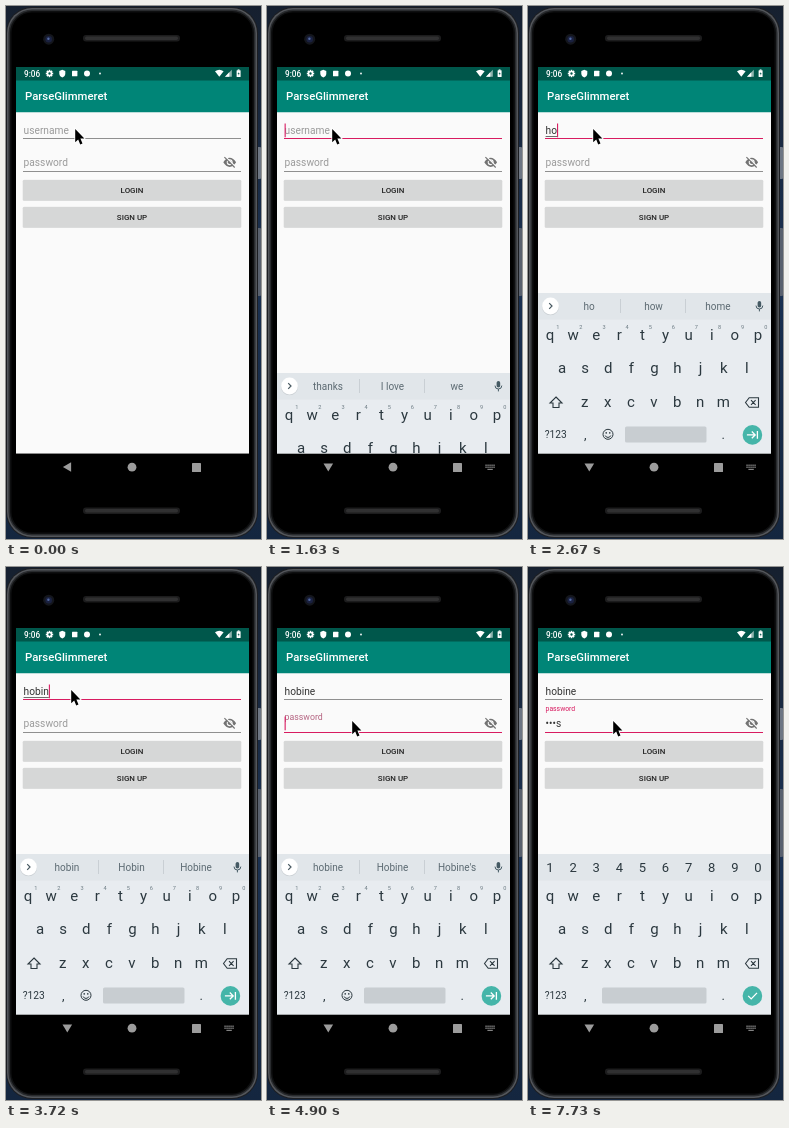
Animation of 255 by 533 pixels, one loop 8 s. Source, as an HTML page with a canvas:

```html
<!DOCTYPE html>
<html lang="en">
<head>
<meta charset="utf-8">
<title>Login screen</title>
<style>
html, body { margin: 0; width: 100%; height: 100%; overflow: hidden; background: #16263f; }
canvas { display: block; width: 255px; height: 533px; }
</style>
</head>
<body>
<canvas id="stage"></canvas>
<script>
const W = 255, H = 533, LOOP = 8000;
const canvas = document.getElementById('stage');
const ratio = window.devicePixelRatio || 1;
canvas.width = W * ratio;
canvas.height = H * ratio;
const c = canvas.getContext('2d');
c.scale(ratio, ratio);

const PINK = '#d81b60', INK = '#2b383f', GREY = '#9b9b9b', DARK = '#333';
const NAV_TOP = 447.8;

const ticks = [0, 900, 1190, 1340, 1480, 1630, 1780, 2220, 2520, 2670, 2970, 3270, 3720, 4020,
  4170, 4320, 4460, 4610, 4760, 4900, 5050, 5350, 5950, 6250, 6690, 6990, 7130, 7730];
const FOCUS_NAME = 1190, KEYBOARD = 1480, FOCUS_PASS = 4900, PASS_KEYS = 5050;
const caretTimes = [[1190, 1780], [2220, 4610], [4900, 5350], [5950, 7730]];
const nameTyping = [[2220, 'h'], [2520, 'ho'], [2970, 'hob'], [3270, 'hobi'], [3720, 'hobin'], [4020, 'hobine']];
const passTyping = [[6250, 'p'], [6690, '•a'], [6990, '••s'], [7130, '•••s']];
const suggestions = [
  [0, ['thanks', 'I love', 'we']], [2220, ['h', 'have', 'he']], [2670, ['ho', 'how', 'home']],
  [2970, ['hob', 'Hob', 'hobby']], [3270, ['hobi', 'Hobi', 'hobbies']],
  [3720, ['hobin', 'Hobin', 'Hobine']], [4020, ['hobine', 'Hobine', "Hobine's"]]
];

const clamp = v => Math.max(0, Math.min(1, v));
const lerp = (a, b, k) => a + (b - a) * k;
const ease = k => (1 - Math.cos(Math.PI * clamp(k))) / 2;
const latest = (list, t, none) => list.reduce((v, [at, value]) => t >= at ? value : v, none);

function text(s, x, y, size, color, align = 'left', weight = 400) {
  c.font = `${weight} ${size}px Roboto, sans-serif`;
  c.textAlign = align;
  c.fillStyle = color;
  c.fillText(s, x, y);
}
function rect(x, y, w, h, color, r = 0) {
  c.fillStyle = color;
  c.beginPath();
  c.roundRect(x, y, w, h, r);
  c.fill();
}
function disc(x, y, r, color) {
  c.fillStyle = color;
  c.beginPath();
  c.arc(x, y, r, 0, 7);
  c.fill();
}
function shape(d, x, y, color, lineWidth) {
  const path = new Path2D(d);
  c.save();
  c.translate(x, y);
  c.fillStyle = c.strokeStyle = color;
  c.lineWidth = lineWidth || 1;
  lineWidth ? c.stroke(path) : c.fill(path, 'evenodd');
  c.restore();
}

function drawPhone() {
  const sky = c.createLinearGradient(0, 0, 0, H);
  sky.addColorStop(0, '#16202f');
  sky.addColorStop(0.5, '#1b3253');
  sky.addColorStop(1, '#14263f');
  rect(0, 0, W, H, sky);
  rect(251, 141, 4, 32, '#6d7683', 1);
  rect(251, 222, 4, 68, '#59616e', 1);
  // Metal rim, from the outer edge to the glass.
  [[0, '#1c1e22'], [1, '#53565b'], [2.5, '#292b2e'], [4, '#0e0f10'], [5.5, '#000']].forEach(([inset, color]) =>
    rect(inset, 1 + inset, 252 - 2 * inset, 531 - 2 * inset, color, 26 - inset));
  for (const y of [29, 501.5]) {
    rect(77, y, 97, 6.5, '#1c1c1d', 3);
    rect(79, y + 1.5, 93, 3.5, '#303031', 2);
  }
  disc(42.7, 33.2, 5.5, '#14161c');
  disc(42.7, 33.2, 3.3, '#1a2140');
  disc(42.4, 32.8, 1.2, '#5268a0');
}

function drawBars() {
  rect(10, 61, 233, NAV_TOP - 61, '#fafafa');
  rect(10, 74, 233, 32.2, '#008577');
  rect(10, 61, 233, 13.5, '#00574b');
  text('9:06', 18, 71, 8.2, '#fff', 'left', 500);
  for (let i = 0; i < 8; i++) {
    c.save();
    c.translate(43.5, 67.5);
    c.rotate(i * Math.PI / 4);
    rect(-0.8, -3.7, 1.6, 2, '#fff');
    c.restore();
  }
  c.strokeStyle = '#fff';
  c.lineWidth = 1.6;
  c.beginPath();
  c.arc(43.5, 67.5, 2, 0, 7);
  c.stroke();
  shape('M0-3.8 3-2.6V0Q3 2.8 0 4Q-3 2.8-3 0V-2.6Z', 56.3, 67.5, '#fff');
  rect(66, 64.8, 5.4, 5.4, '#fff', 0.5);
  disc(81, 67.5, 3, '#fff');
  disc(94, 67.5, 0.9, '#fff');
  shape('M0 3.6-4.3-1.9Q0-5 4.3-1.9Z', 213.3, 67.2, '#fff');
  shape('M3.3-3.5V3.5H-3.5Z', 222.5, 67.3, '#8fb5af');
  shape('M.8-1V3.5H-3.5Z', 222.5, 67.3, '#fff');
  rect(230.6, 64.3, 4, 6.8, '#fff', 0.5);
  rect(231.7, 63.4, 1.8, 1.2, '#fff');
  shape('M.4-2-1 .4H0V2L1-.5H0Z', 232.6, 67.7, '#00574b');
  text('ParseGlimmeret', 19, 94.3, 11.34, '#fff', 'left', 500);
}

function drawUnderline(y, focused) {
  rect(17, y, 218, focused ? 1.1 : 0.9, focused ? PINK : '#8f8f8f');
}

function drawForm(t) {
  const name = latest(nameTyping, t, ''), pass = latest(passTyping, t, '');
  const onPass = t >= FOCUS_PASS, onName = t >= FOCUS_NAME && !onPass;
  const size = 10.2, left = 17.6;

  drawUnderline(132, onName);
  text(name || 'username', left, 128.2, size, name ? DARK : GREY);
  const nameWidth = name ? c.measureText(name).width : 0;
  if (name && onName) rect(left, 130, nameWidth, 0.7, DARK);

  // The hint floats up to become a small pink label.
  const k = clamp((t - 4830) / 167);
  const tint = [[155, 216], [155, 27], [155, 96]].map(([a, b]) => Math.round(lerp(a, b, k)));
  drawUnderline(165, onPass);
  text('password', left, lerp(160, 143.5, k), lerp(size, 6.8, k), `rgb(${tint})`);
  text(pass, left, 160.3, size, DARK);
  const passWidth = c.measureText(pass).width;

  if (caretTimes.some(([on, off]) => t >= on && t < off)) {
    const x = left + (onPass ? passWidth : nameWidth);
    rect(x, onPass ? 149.5 : 117.5, 1.1, 13.8, PINK);
  }

  shape('M-6.4 0Q-3.6-4.6 0-4.6T6.4 0Q3.6 4.6 0 4.6T-6.4 0ZM-3 0A3 3 0 1 0 3 0A3 3 0 1 0-3 0Z', 223.7, 156.3, '#737373');
  disc(223.7, 156.3, 1.8, '#737373');
  shape('M-4.5-5.8 5.8 4.5', 223.7, 156.3, '#fafafa', 1.3);
  shape('M-5.3-5.1 5 5.2', 223.7, 156.3, '#737373', 1.1);

  [['LOGIN', 174], ['SIGN UP', 201]].forEach(([label, y]) => {
    rect(16.6, y - 0.2, 218.8, 21.2, 'rgba(0,0,0,.1)', 1.5);
    rect(17, y, 218, 20.5, '#d6d7d7', 1);
    text(label, 126, y + 13.1, 7.94, '#222', 'center', 500);
  });
}

function drawKeys(row, x, y, size = 15) {
  [...row].forEach((key, i) => text(key, x + i * 23.1, y, size, INK, 'center'));
}

function drawKeyboard(t) {
  const shown = ease((t - KEYBOARD) / 300);
  if (!shown) return;
  const secret = t >= PASS_KEYS;
  c.save();
  c.beginPath();
  c.rect(10, 106, 233, NAV_TOP - 106);
  c.clip();
  c.translate(0, (1 - shown) * 160);
  rect(10, 287, 233, 161, '#e8ecf0');
  rect(10, 287, 233, 26.5, '#e1e6ea');

  if (secret) {
    drawKeys('1234567890', 22, 305, 13);
  } else {
    disc(22.5, 300.7, 8.6, '#ccd1d5');
    disc(22.5, 300, 8.4, '#fff');
    shape('M-1.3-2.8 1.5 0-1.3 2.8', 22.5, 300, '#4a5a63', 1.2);
    rect(92, 293, 0.8, 14, '#c3c9ce');
    rect(157, 293, 0.8, 14, '#c3c9ce');
    latest(suggestions, t).forEach((word, i) => text(word, 61 + i * 64.5, 304, 10, '#5c6a72', 'center'));
    rect(229.6, 295, 3.6, 6.6, '#455a64', 1.8);
    shape('M-3.4-.4A3.4 3.4 0 0 0 3.4-.4M0 3V5.4', 231.4, 300, '#455a64', 1);
    [...'1234567890'].forEach((d, i) => text(d, 29.8 + i * 23.1, 322.5, 5.6, '#6b7a82', 'center'));
  }

  drawKeys('qwertyuiop', 22, 333.5);
  drawKeys('asdfghjkl', 34, 367);
  drawKeys('zxcvbnm', 56.7, 400.5);
  shape('M0-5.5 6 .5H3V5H-3V.5H-6Z', 28, 396.5, INK, 1.1);
  shape('M-6.5 0-2.8-4.8H6.5V4.8H-2.8ZM-1-2.3 3.6 2.3M3.6-2.3-1 2.3', 224, 396.5, INK, 1.1);

  text('?123', 27.8, 432.2, 10.2, INK, 'center');
  text(',', 57.2, 432.5, 13, INK, 'center');
  text('.', 195.2, 432.5, 13, INK, 'center');
  const spaceLeft = secret ? 74 : 97;
  rect(spaceLeft, 420.5, 178.5 - spaceLeft, 16, '#c8cdd1', 1.5);
  if (!secret) {
    shape('M-5 0A5 5 0 1 0 5 0A5 5 0 1 0-5 0M-2.8 1.2A3 3 0 0 0 2.8 1.2', 80, 428.3, INK, 1);
    disc(78.2, 426.9, 0.8, INK);
    disc(81.8, 426.9, 0.8, INK);
  }
  disc(224.4, 428.9, 9.8, '#45b5a9');
  shape(secret ? 'M-4.2 0-1.2 3 4.6-3' : 'M-5.5 0H2.8M-.6-3.4 2.8 0-.6 3.4M5-3.8V3.8', 224.4, 428.9, '#fff', 1.3);
  c.restore();
}

function drawNav(t) {
  const color = '#9c9c9c', open = t >= KEYBOARD;
  rect(10, NAV_TOP, 233, 27.2, '#000');
  shape(open ? 'M-4.8-3.6H4.8L0 4.4Z' : 'M3.8-4.8V4.8L-4.4 0Z', 61.3, 461, color);
  disc(126, 461.2, 4.4, color);
  rect(186, 457, 9, 9, color, 0.6);
  if (!open) return;
  for (let i = 0; i < 10; i++) rect(218.4 + i % 5 * 2, 458.6 + (i > 4) * 2, 1.3, 1.3, '#828282');
  rect(220.4, 462.8, 5.4, 1.2, '#828282');
}

function drawPointer(t) {
  const k = ease((t - 4020) / 590);
  const x = lerp(t < 900 ? 69.2 : 65.2, 85.2, k), y = lerp(123, 154, k);
  const arrow = 'M0 0V13.2L3 10.4 5 15.4 7.3 14.4 5.2 9.6H9.2Z';
  shape(arrow, x, y, '#fff', 1.6);
  shape(arrow, x, y, '#000');
}

function frame(now) {
  const elapsed = now % LOOP;
  const t = ticks.filter(tick => tick <= elapsed).pop() || 0;
  drawPhone();
  drawBars();
  drawForm(t);
  drawKeyboard(t);
  drawNav(t);
  drawPointer(t);
  requestAnimationFrame(frame);
}
frame(0);
</script>
</body>
</html>
```
